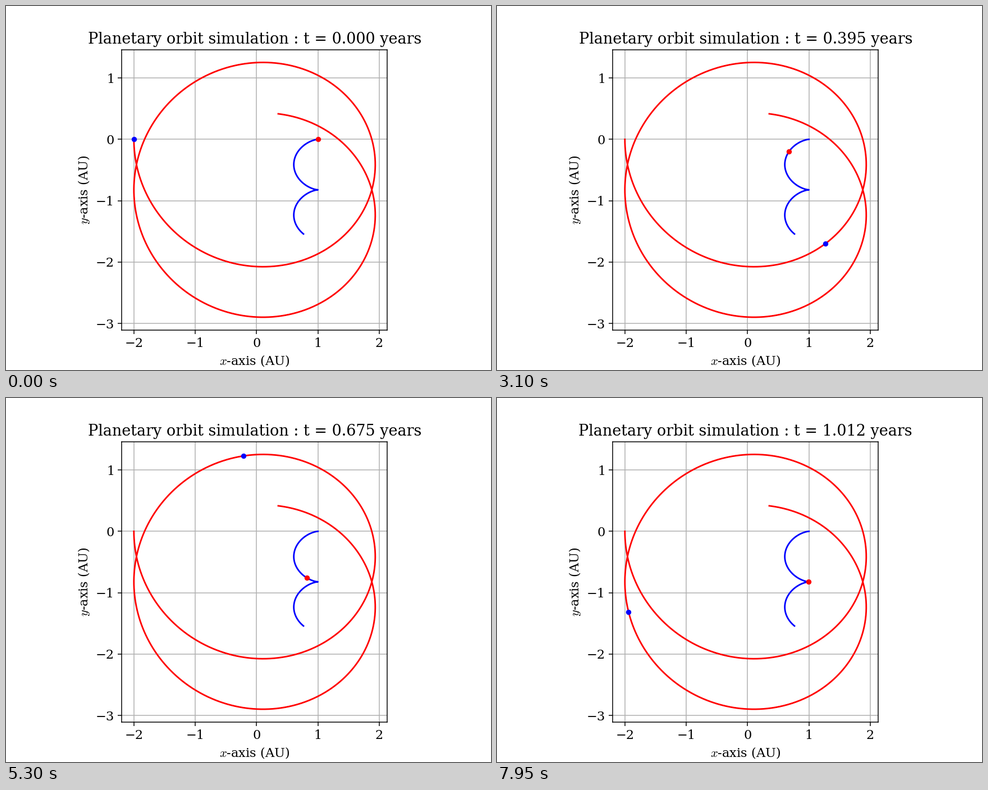
Animation, 864 px wide and 648 px high, one loop 8 s. Source, as a matplotlib script:

```python
import numpy as np
import matplotlib.pyplot as plt
from matplotlib.animation import FuncAnimation
from matplotlib.ticker import MultipleLocator

plt.rcParams.update({
    "font.family": "DejaVu Serif",
    "font.size": 12,
    "mathtext.fontset": "cm",
})

# Units with G = 1, so one year lasts 2*pi
STAR_MASS, PLANET_MASS = 10.0, 1.0
TOTAL = STAR_MASS + PLANET_MASS
START_GAP, START_SPEED = 3.0, 1.5
DT, T_END = 0.04, 10.0
FRAMES, INTERVAL = 160, 50

# The bodies start at the farthest point of their relative ellipse
A = 1 / (2 / START_GAP - START_SPEED**2 / TOTAL)
ECC = START_GAP / A - 1
B = A * np.sqrt(1 - ECC**2)
RATE = np.sqrt(TOTAL / A**3)
CENTRE_X = (STAR_MASS * 1.0 - PLANET_MASS * 2.0) / TOTAL
DRIFT = -PLANET_MASS * START_SPEED / TOTAL


def positions(t):
    """Planet and star coordinates at time t, from Kepler's equation."""
    t = np.atleast_1d(t)
    mean = np.pi + RATE * t
    ecc_anom = mean.copy()
    for _ in range(20):
        ecc_anom -= ((ecc_anom - ECC * np.sin(ecc_anom) - mean)
                     / (1 - ECC * np.cos(ecc_anom)))
    rel = np.array([A * (np.cos(ecc_anom) - ECC), B * np.sin(ecc_anom)])
    centre = np.array([np.full_like(t, CENTRE_X), DRIFT * t])
    planet = centre + rel * STAR_MASS / TOTAL
    star = centre - rel * PLANET_MASS / TOTAL
    return planet, star


fig, ax = plt.subplots(figsize=(6.4, 4.8), dpi=135)
planet_path, star_path = positions(np.linspace(0, T_END, 1001))
ax.plot(*planet_path, "r-")
ax.plot(*star_path, "b-")
planet_dot, = ax.plot(*planet_path[:, :1], "bo", markersize=4)
star_dot, = ax.plot(*star_path[:, :1], "ro", markersize=4)

ax.set_aspect("equal")
ax.xaxis.set_major_locator(MultipleLocator(1))
ax.yaxis.set_major_locator(MultipleLocator(1))
ax.grid()
ax.set_xlabel("$x$-axis (AU)")
ax.set_ylabel("$y$-axis (AU)")
title = ax.set_title("")


def update(i):
    t = i * DT
    planet, star = positions(t)
    planet_dot.set_data(*planet)
    star_dot.set_data(*star)
    years = t / (2 * np.pi)
    title.set_text(f"Planetary orbit simulation : t = {years:.3f} years")
    return planet_dot, star_dot, title


anim = FuncAnimation(fig, update, frames=FRAMES, interval=INTERVAL,
                     repeat=True, repeat_delay=0)
plt.show()
```
